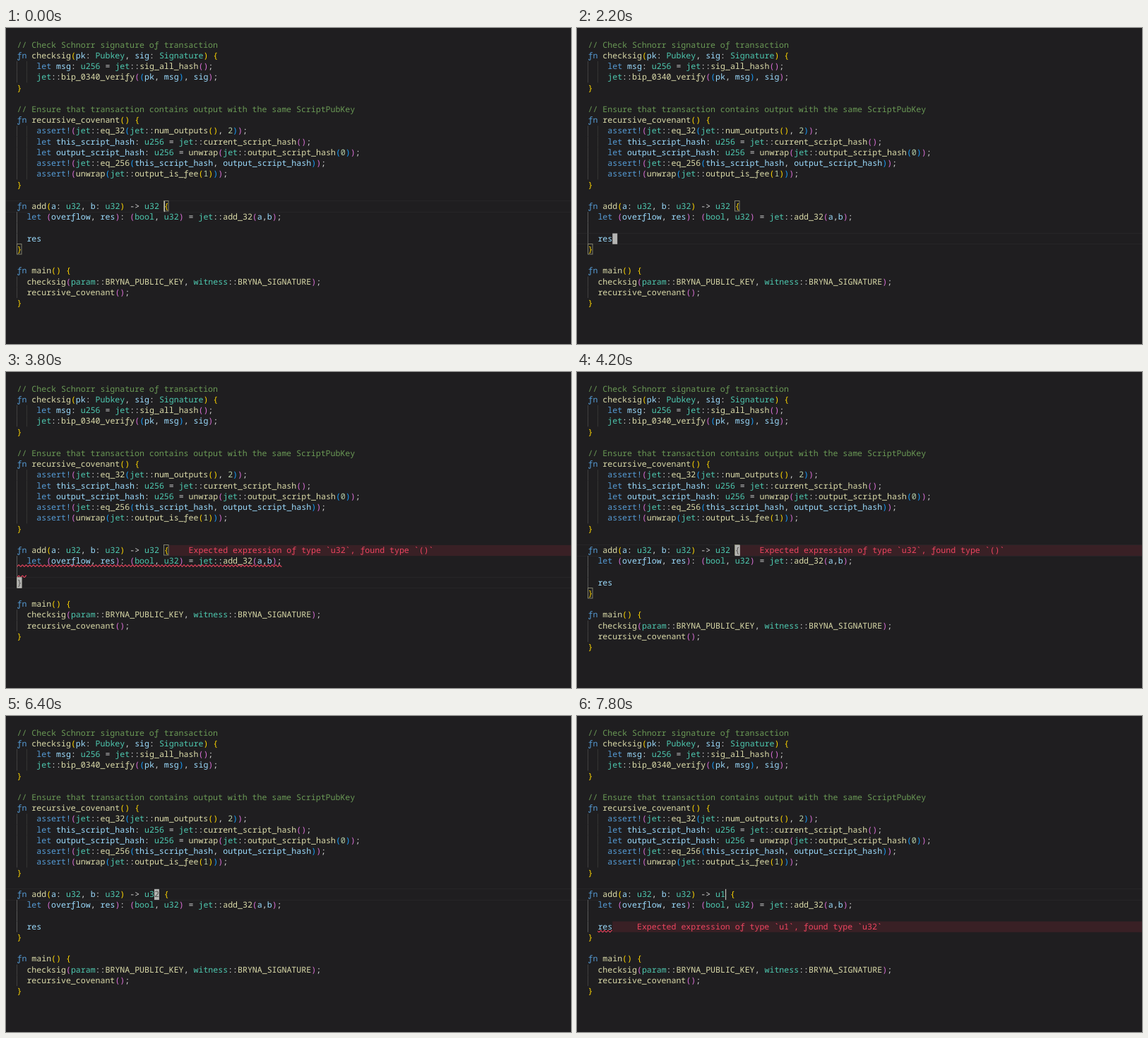
Recreate the animation shown at these times as an HTML page with a canvas. Size 800x447 px, loop 8 s.

```html
<!DOCTYPE html>
<html lang="en">
<head>
<meta charset="utf-8">
<title>Code editor</title>
<style>
html, body { margin: 0; width: 100%; height: 100%; overflow: hidden; background: #1f1e20; }
canvas { display: block; }
</style>
</head>
<body>
<canvas id="stage" width="800" height="447"></canvas>
<script>
const ctx = document.getElementById("stage").getContext("2d");
const LOOP = 8000, LEFT = 15.5, TOP = 16.4, CHAR = 6.945, ROW = 15.23;
const ADD = 15, RES = 18;          // rows that get edited
const BACKGROUND = "#1f1e20", RED = "#ee4560";
const BRACKETS = ["#ffd700", "#da70d6", "#179fff"];

const CODE = `// Check Schnorr signature of transaction
fn checksig(pk: Pubkey, sig: Signature) {
    let msg: u256 = jet::sig_all_hash();
    jet::bip_0340_verify((pk, msg), sig);
}

// Ensure that transaction contains output with the same ScriptPubKey
fn recursive_covenant() {
    assert!(jet::eq_32(jet::num_outputs(), 2));
    let this_script_hash: u256 = jet::current_script_hash();
    let output_script_hash: u256 = unwrap(jet::output_script_hash(0));
    assert!(jet::eq_256(this_script_hash, output_script_hash));
    assert!(unwrap(jet::output_is_fee(1)));
}

fn add(a: u32, b: u32) -> u32 {
  let (overflow, res): (bool, u32) = jet::add_32(a,b);
  
  res
}

fn main() {
  checksig(param::BRYNA_PUBLIC_KEY, witness::BRYNA_SIGNATURE);
  recursive_covenant();
}`.split("\n");

const TOKENS = [
  [/^\/\/.*/, "#6a9955"],
  [/^(fn|let|assert)\b!?/, "#569cd6"],
  [/^(u\d*|bool|Pubkey|Signature|jet|param|witness)\b/, "#4ec9b0"],
  [/^[A-Z]+_[A-Z_]+/, "#dcdcaa"],
  [/^\w+(?=\()/, "#dcdcaa"],
  [/^\d+/, "#b5cea8"],
  [/^\w+/, "#9cdcfe"],
  [/^[(){}]/, null],
  [/^[^\w(){}\s]+/, "#d4d4d4"],
  [/^\s+/, "#d4d4d4"]
];

// time, row, column, insert mode
const CURSOR = [
  [0, 15, 30, true], [500, 15, 30], [1800, 16, 30], [1900, 17, 1], [2200, 18, 5],
  [2500, 18, 0], [4000, 18, 5], [4100, 16, 30], [4200, 15, 30], [4700, 14, 0],
  [4800, 13, 0], [5400, 14, 0], [5600, 15, 30], [6100, 15, 29], [6400, 15, 28],
  [6500, 15, 27], [6800, 15, 27, true], [7200, 15, 28, true]
];

const colX = col => LEFT + col * CHAR;
const rowY = row => TOP + row * ROW;

// The editor face draws its f with a descending hook.
function write(text, row, col, color) {
  ctx.fillStyle = color;
  ctx.fillText(text.replaceAll("f", "ƒ"), colX(col), rowY(row) + 11.2);
}

function rect(x, y, w, h, color) {
  ctx.fillStyle = color;
  ctx.fillRect(x, y, w, h);
}

function linesAt(t) {
  const lines = [...CODE];
  if (t >= 6800) lines[ADD] = lines[ADD].replace("-> u32", t < 7200 ? "-> u" : "-> u1");
  if (t >= 2500 && t < 4000) lines.splice(RES, 1);
  return lines;
}

function drawCode(lines) {
  let depth = 0;
  lines.forEach((line, row) => {
    const indent = line.match(/^ */)[0].length;
    for (let col = 0; col < indent; col += 2) {
      const active = row > ADD && row < ADD + 4;
      rect(Math.floor(colX(col)), rowY(row), 1, ROW, active ? "#585858" : col ? "#343434" : "#404040");
    }
    for (let col = 0; col < line.length;) {
      const rest = line.slice(col);
      const [pattern, tint] = TOKENS.find(([p]) => p.test(rest));
      const text = rest.match(pattern)[0];
      let color = tint;
      if (!color) {
        const opens = "({".includes(text);
        if (!opens) depth--;
        color = BRACKETS[depth % 3];
        if (opens) depth++;
      }
      write(text, row, col, color);
      col += text.length;
    }
  });
}

function boxBracket(row, col) {
  ctx.strokeStyle = "#80806c";
  ctx.lineWidth = 1;
  ctx.strokeRect(Math.floor(colX(col)) + 0.5, Math.floor(rowY(row)) + 0.5, 6.5, 14.5);
}

function drawBracketPair(lines, row, col) {
  const inside = (from, to) => row >= from && row <= to;
  const end = lines.indexOf("}", ADD);
  if (inside(7, 13)) {
    boxBracket(7, lines[7].length - 1);
    boxBracket(13, 0);
  } else if (inside(ADD + 1, end) || (row === ADD && col === 30)) {
    boxBracket(ADD, lines[ADD].length - 1);
    boxBracket(end, 0);
  }
}

function drawCursor(lines, [, row, col, insert]) {
  if (insert) return rect(colX(col), rowY(row), 1.2, ROW, "#c0c0b8");
  rect(colX(col), rowY(row), CHAR, ROW, "#b4b4b2");
  write(lines[row][col] || " ", row, col, "#55534f");
}

function squiggle(row, from, to) {
  const y = rowY(row) + 14;
  ctx.strokeStyle = RED;
  ctx.lineWidth = 1.1;
  ctx.beginPath();
  for (let x = colX(from); x <= colX(to); x += 0.5) {
    ctx.lineTo(x, y + 1.2 * Math.cos((x - LEFT) * Math.PI * 2 / 5.2));
  }
  ctx.stroke();
}

function drawError(row, lineEnd, col, message) {
  rect(colX(lineEnd), rowY(row), 800, ROW, "#392025");
  write(message, row, col, RED);
}

function draw(t) {
  const lines = linesAt(t);
  const cursor = CURSOR.findLast(([start]) => t >= start);
  const [, row, col] = cursor;

  rect(0, 0, 800, 447, BACKGROUND);
  rect(0, Math.floor(rowY(row)), 800, 1, "#262527");
  rect(0, Math.floor(rowY(row + 1)), 800, 1, "#262527");

  if (t >= 3100 && t < 4500) {
    drawError(ADD, 31, 35, "Expected expression of type `u32`, found type `()`");
  }
  if (t >= 7400) {
    drawError(RES, 5, 10, "Expected expression of type `u1`, found type `u32`");
    squiggle(RES, 2, 5);
  }
  drawCode(lines);
  if (t >= 2800 && t < 4000) {
    squiggle(ADD + 1, 0, lines[ADD + 1].length);
    squiggle(ADD + 2, 0, 2);
  }
  drawBracketPair(lines, row, col);
  drawCursor(lines, cursor);
}

ctx.font = '500 11.575px "Noto Sans Mono", "DejaVu Sans Mono", monospace';
ctx.textRendering = "geometricPrecision";
const start = performance.now();
function tick() {
  draw((performance.now() - start) % LOOP);
  requestAnimationFrame(tick);
}
tick();
</script>
</body>
</html>
```
